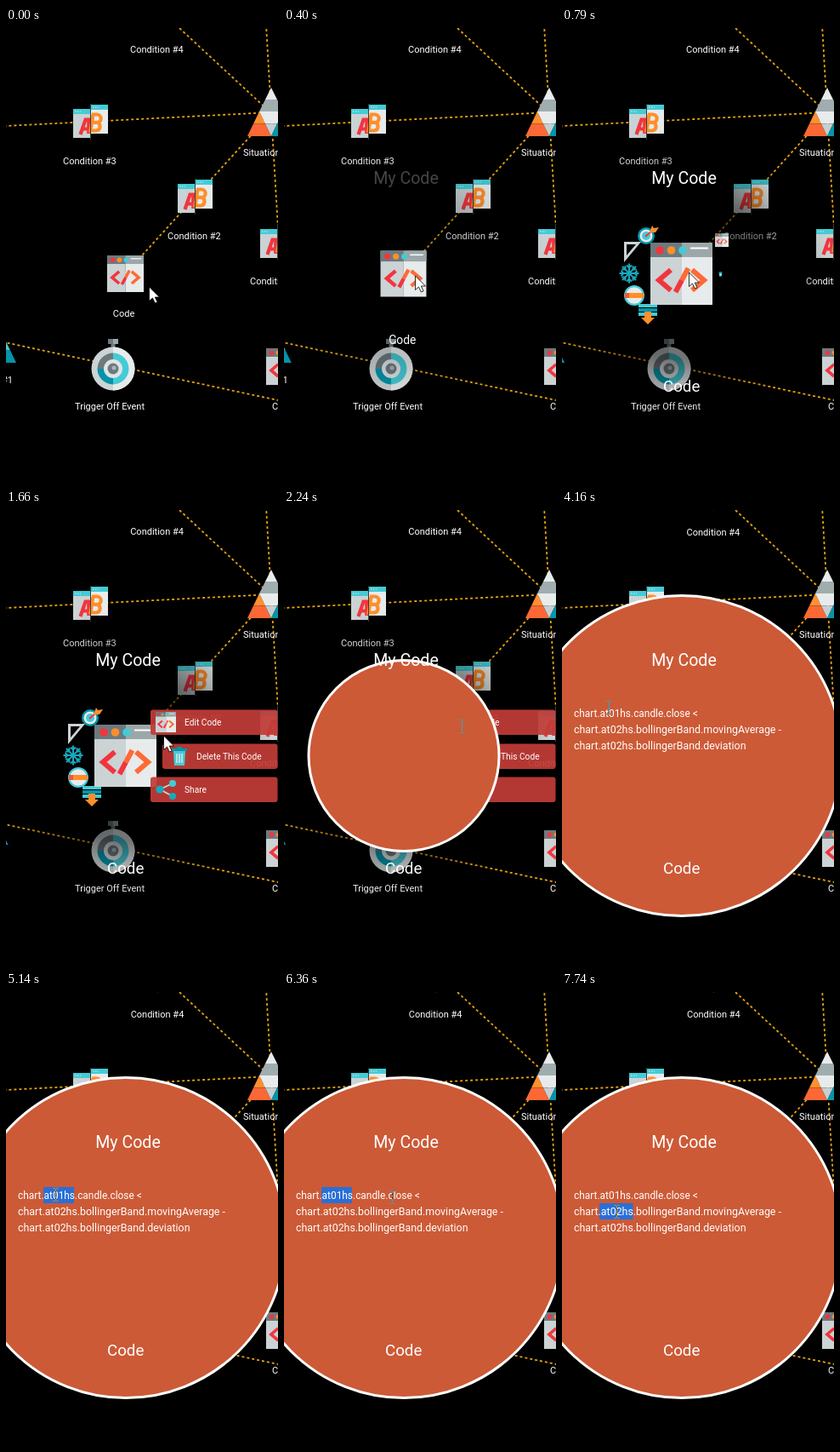
An HTML page for the animation above (8 s loop, 320 by 533 pixels).

```html
<!DOCTYPE html>
<html lang="en">
<head>
<meta charset="utf-8">
<title>Node editor</title>
<style>
html, body { margin: 0; width: 100%; height: 100%; overflow: hidden; background: #000; }
svg { display: block; width: 100vw; height: 100vh; }
text { font-family: Roboto, "Open Sans", sans-serif; font-size: 11px; fill: #fff; white-space: pre; }
.big { font-size: 19.6px; }
.bar text { font-size: 10.2px; }
.link { stroke: #e5a20e; stroke-width: 1.8; stroke-dasharray: 3 3; }
#beam { mix-blend-mode: difference; }
</style>
</head>
<body>
<svg viewBox="0 0 320 533" preserveAspectRatio="none">
<defs>
  <radialGradient id="shade">
    <stop offset="0" stop-opacity=".6"/><stop offset=".58" stop-opacity=".5"/>
    <stop offset=".76" stop-opacity=".25"/><stop offset="1" stop-opacity="0"/>
  </radialGradient>

  <g id="codeIcon">
    <path fill="#cbd3d5" d="M0 0H37V73H0z"/><path fill="#e7ebec" d="M37 0H73V73H37z"/>
    <path fill="#6c7a7f" d="M0 0H37V17H0z"/><path fill="#9ca7a9" d="M37 0H73V17H37z"/>
    <circle cx="11" cy="9" r="4.8" fill="#f2353d"/><circle cx="24.5" cy="9" r="4.8" fill="#ff8f2a"/>
    <circle cx="38" cy="9" r="4.8" fill="#44cbd6"/>
    <path stroke="#fff" stroke-width="2" d="M47 6.5H68"/>
    <g fill="none" stroke-width="6">
      <path stroke="#f2353d" d="M24 32L10 44L24 56"/><path stroke="#ff6a35" d="M49 32L63 44L49 56"/>
      <path stroke="#f2353d" d="M29.5 58L37 44"/><path stroke="#ff6a35" d="M37 44L44.5 30"/>
    </g>
  </g>

  <g id="abIcon">
    <path fill="#c9d2d4" d="M0 5H20.5V39H0z"/><path fill="#e7ebec" d="M20.5 0H41V34H20.5z"/>
    <path fill="#44cbd6" d="M0 5H20.5V11H0zM20.5 0H41V6H20.5z"/>
    <path stroke="#d8f3f5" stroke-dasharray="1.5 1.5" d="M2 8H9M23 3H30"/>
    <g fill="none" stroke-width="4.2">
      <path stroke="#f2353d" d="M8.5 35L14.5 17.5H18.3V34M11 28.5H19"/>
      <path stroke="#ff8f2a" d="M23.5 11.5L20.5 30.5H27.5A5 5 0 0 0 28 20.8H22H28A4.6 4.6 0 0 0 28 11.5H22"/>
    </g>
    <path stroke="#343c3f" d="M20.5 -1V41"/>
  </g>

  <g id="triIcon">
    <path fill="#e8ebec" d="M28 0L35 14H21z"/><path fill="#a0adaf" d="M21 14H35L42 28H14z"/>
    <path fill="#ff8f2f" d="M14 28L21 42.5H7z"/><path fill="#fb6836" d="M7 42.5H21L28 57H0z"/>
    <path fill="#e8ebec" d="M14 28H42L35 42.5H21z"/><path fill="#c6cfd1" d="M21 42.5H35L28 57z"/>
    <path fill="#44cbd6" d="M42 28L49 42.5H35z"/><path fill="#0594a9" d="M35 42.5H49L56 57H28z"/>
  </g>

  <g id="watch">
    <path fill="#6c7a7f" d="M-2.5 -31H2.5V-23H-2.5z"/>
    <path fill="#6c7a7f" d="M-6 -35H0V-29H-6z"/><path fill="#9ca7a9" d="M0 -35H6V-29H0z"/>
    <circle r="25.5" fill="#cbd3d5"/><path fill="#e7ebec" d="M0 -25.5A25.5 25.5 0 0 1 0 25.5z"/>
    <path fill="#6c7a7f" d="M0 0H-18.5A18.5 18.5 0 0 1 0 -18.5z"/>
    <path fill="#0594a9" d="M0 0V18.5A18.5 18.5 0 0 1 -18.5 0z"/>
    <path fill="#44cbd6" d="M0 -18.5A18.5 18.5 0 0 1 0 18.5z"/>
    <circle r="11" fill="#dfe4e6"/><circle r="6.5" fill="#6c7a7f"/><circle cx="1" cy="-1" r="2.5" fill="#a9b7ba"/>
  </g>

  <g id="target">
    <circle r="10" fill="#0594a9"/><circle r="7.5" fill="#e7ebec"/><circle r="5" fill="#44cbd6"/>
    <path stroke="#f2353d" stroke-width="2" d="M-1 1L8 -7"/>
    <path fill="#ff8f2a" d="M4 -4L7 -12L9 -9L15 -10L11 -4z"/>
  </g>
  <path id="square" fill="#cbd3d5" fill-rule="evenodd" d="M-10 -12H10L-10 12zM-7 -9V4L4 -9z"/>
  <g id="flake" fill="none" stroke="#18a9bd" stroke-width="2"></g>
  <g id="gauge">
    <circle r="12" fill="#44cbd6"/><circle r="9.8" fill="#e7ebec"/>
    <path fill="#ff8f2a" d="M-11 -3H11V3H-11z"/><path fill="#f2553a" d="M-11 -3H-6V3H-11z"/>
  </g>
  <g id="stack">
    <path fill="#44cbd6" d="M-11 -12H11V-8H-11z"/><path fill="#0594a9" d="M-11 -7H11V-3H-11z"/>
    <path fill="#44cbd6" d="M-11 -2H11V2H-11z"/>
    <path fill="#ff8f2a" d="M-4 -3H4V4H8L0 12L-8 4H-4z"/>
  </g>
  <g id="edit"><use href="#codeIcon" transform="translate(-12 -12) scale(.329)"/></g>
  <g id="trash">
    <path fill="#44cbd6" d="M-7 -6H7L6 11H-6z"/><path fill="#0594a9" d="M-9 -9H9V-6H-9zM-3 -11H3V-9H-3z"/>
    <path stroke="#e7ebec" stroke-width="1.4" d="M-3 -3V8M0 -3V8M3 -3V8"/>
  </g>
  <g id="share">
    <path fill="none" stroke="#cbd3d5" stroke-width="1.8" d="M8 -7L-7 0L8 8"/>
    <circle cx="-7" r="4.6" fill="#18a9bd"/><circle cx="8" cy="-7" r="4" fill="#44cbd6"/><circle cx="8" cy="8" r="4" fill="#18a9bd"/>
  </g>
</defs>

<rect width="320" height="533"/>
<g class="link">
  <path d="M312 99L0 115M312 100L140 289M312 100L304.5 -30M312 100L321 252M-16 366L327 438.5"/>
  <path id="topLink"/>
</g>
<g id="topNode"><use href="#abIcon" x="157" y="-41"/><text x="146" y="29">Condition #4</text></g>
<use href="#abIcon" x="79" y="90"/><text x="67" y="160">Condition #3</text>
<use href="#abIcon" x="202" y="178"/><text x="190" y="248">Condition #2</text>
<use href="#abIcon" x="299" y="231"/><text x="287" y="301">Condition #1</text>
<use href="#triIcon" x="284" y="70"/><text x="279" y="150">Situation #2</text>
<use href="#codeIcon" transform="translate(306 376) scale(.59)"/><text x="313" y="448">Code</text>
<use href="#watch" x="126" y="400"/><text x="81" y="448">Trigger Off Event</text>
<g id="leftNode"><use href="#triIcon" x="-44" y="336"/><text x="8" y="417" text-anchor="end">Situation #1</text></g>

<circle id="dim" cx="141" cy="289" r="172" fill="url(#shade)"/>
<g id="tools"></g>
<use id="node" href="#codeIcon"/>
<g id="menu"></g>
<circle id="panel" cx="141" cy="288.5" fill="#cc5a36" stroke="#fff" stroke-width="3"/>
<text id="title" class="big" x="143.5" y="183" text-anchor="middle">My Code</text>
<text id="caption" text-anchor="middle">Code</text>
<g id="code">
  <rect id="mark" x="44" height="19" fill="#2a6fd6"/>
  <text x="14" y="243" style="font-size:11.9px">chart.at01hs.candle.close &lt;</text>
  <text x="14" y="262" style="font-size:12.4px">chart.at02hs.bollingerBand.movingAverage -</text>
  <text x="14" y="281" style="font-size:12.4px">chart.at02hs.bollingerBand.deviation</text>
  <path id="caret" stroke="#fff" d="M0 0V19"/>
</g>
<path id="arrow" fill="#fff" stroke="#000" stroke-width=".8" d="M0 0V16.5L4 13L6.8 19L9.6 17.8L6.8 12H12z"/>
<path id="beam" fill="none" stroke="#fff" d="M-3 -7.5H-1L0 -6.5L1 -7.5H3M0 -6.5V6.5M-3 7.5H-1L0 6.5L1 7.5H3"/>
</svg>
<script>
const LOOP = 8000;
const $ = id => document.getElementById(id);
const set = (id, attrs) => { for (const k in attrs) $(id).setAttribute(k, attrs[k]); };
const show = (id, on) => set(id, { visibility: on ? 'visible' : 'hidden' });
const mix = (a, b, p) => a + (b - a) * p;
const ramp = (t, a, b) => Math.min(1, Math.max(0, (t - a) / (b - a)));
const ease = p => p * p * (3 - 2 * p);

const bursts = [[0, 0, 1], [130, 1030, 8], [1180, 2090, 8], [2240, 2540, 3], [2810, 2940, 2],
  [3210, 4160, 8], [4310, 5290, 8], [5410, 6360, 8], [6510, 7470, 8], [7740, 7740, 1]];
const ticks = bursts.flatMap(([a, b, n]) =>
  Array.from({ length: n }, (_, i) => n > 1 ? mix(a, b, i / (n - 1)) : a));
const snap = t => ticks.filter(k => k <= t + 0.5).pop();

// Pointer: time, x, y
const route = [[0, 168, 304], [130, 166, 302], [520, 149, 287], [1180, 150, 287], [1560, 185, 265],
  [1820, 185, 265], [2090, 198, 251], [2390, 220, 256], [2540, 222, 256], [2940, 208, 252],
  [3900, 56, 234], [4160, 55, 232], [4700, 58, 238], [5410, 58, 238], [6360, 127, 241],
  [6600, 125, 243], [7340, 64, 258], [8000, 64, 258]];

function pointer(t) {
  const i = Math.max(1, route.findIndex(k => k[0] > t));
  const [a, b] = [route[i - 1], route[i]];
  const p = ease(ramp(t, a[0], b[0]));
  return [mix(a[1], b[1], p), mix(a[2], b[2], p)];
}

const tools = [['target', 99, 244], ['square', 83, 263], ['flake', 79, 288], ['gauge', 85, 314], ['stack', 101, 336]];
// icon, x, y, bar left, label x, label, start of growth
const items = [['edit', 188, 249, 170, 210, 'Edit Code', 500],
  ['trash', 204, 289, 184, 224, 'Delete This Code', 690],
  ['share', 188, 328, 170, 210, 'Share', 780]];

$('flake').innerHTML = [0, 45, 90, 135, 180, 225, 270, 315].map(a =>
  `<path transform="rotate(${a})" d="M0 0V-11.5M-3 -9.5L0 -6.5L3 -9.5"/>`).join('');
$('tools').innerHTML = tools.map(([icon], i) => `<use id="tool${i}" href="#${icon}"/>`).join('');
$('menu').innerHTML = items.map(([icon, x, y, left, tx, label], i) =>
  `<g class="bar" id="bar${i}"><rect x="${left}" y="${y - 14.5}" width="${319.5 - left}" height="29.5" rx="3"
    fill="#c13d37" fill-opacity=".93"/><text x="${tx}" y="${y + 3.7}">${label}</text></g>
   <use id="item${i}" href="#${icon}"/>`).join('');

function draw(t) {
  const open = ease(ramp(t, 130, 760));
  const drift = t / LOOP;

  set('topLink', { d: `M312 100L${179 + drift} ${-23 + drift}` });
  set('topNode', { transform: `translate(${drift} ${drift})` });
  set('leftNode', { transform: `translate(${-9 * open - ramp(t, 1180, 2090)} 0)` });
  set('dim', { opacity: open });

  const size = mix(43, 73, open);
  set('node', { transform: `translate(${140.5 - size / 2} ${288.5 - size / 2}) scale(${size / 73})` });
  tools.forEach(([, x, y], i) => set('tool' + i, {
    transform: `translate(${mix(140, x, open)} ${mix(288, y, open)}) scale(${open})` }));
  items.forEach(([, x, y, , , , start], i) => {
    const p = ramp(t, start, start + 410 - i * 80);
    const slide = Math.min(1, 0.55 + p * 0.7);
    set('item' + i, { transform: `translate(${mix(140, x, slide)} ${mix(288, y, slide)}) scale(${p})` });
    set('bar' + i, { opacity: ramp(t, 880, 1030) });
  });

  const grow = ease(ramp(t, 2100, 2380));
  set('panel', { r: mix(36, 188, grow) });
  show('panel', grow > 0);
  set('title', { opacity: ramp(t, 250, 760) });
  set('caption', { x: mix(138.5, 140.7, open), y: mix(339, 427, open), 'font-size': 11 });
  $('caption').style.fontSize = mix(11, 18.8, open) + 'px';

  show('code', t >= 2390);
  const first = t >= 5000 && t < 7470, second = t >= 7740;
  set('mark', { y: second ? 248 : 229, width: second ? 39.5 : 36 });
  show('mark', first || second);
  const clicked = t >= 7470;
  const lit = t >= 2390 && (clicked || (t - 2390) % 1060 < 530);
  set('caret', { transform: clicked ? 'translate(64.5 248)' : 'translate(217.5 267)' });
  show('caret', lit && !first && !second);

  const [x, y] = pointer(t);
  const at = { transform: `translate(${Math.round(x) + 0.5} ${Math.round(y)})` };
  set('arrow', at);
  set('beam', at);
  show('arrow', t < 2240);
  show('beam', t >= 2240);
}

const begin = performance.now();
function loop(now) {
  draw(snap(Math.max(0, now - begin) % LOOP));
  requestAnimationFrame(loop);
}
draw(0);
requestAnimationFrame(loop);
</script>
</body>
</html>
```
